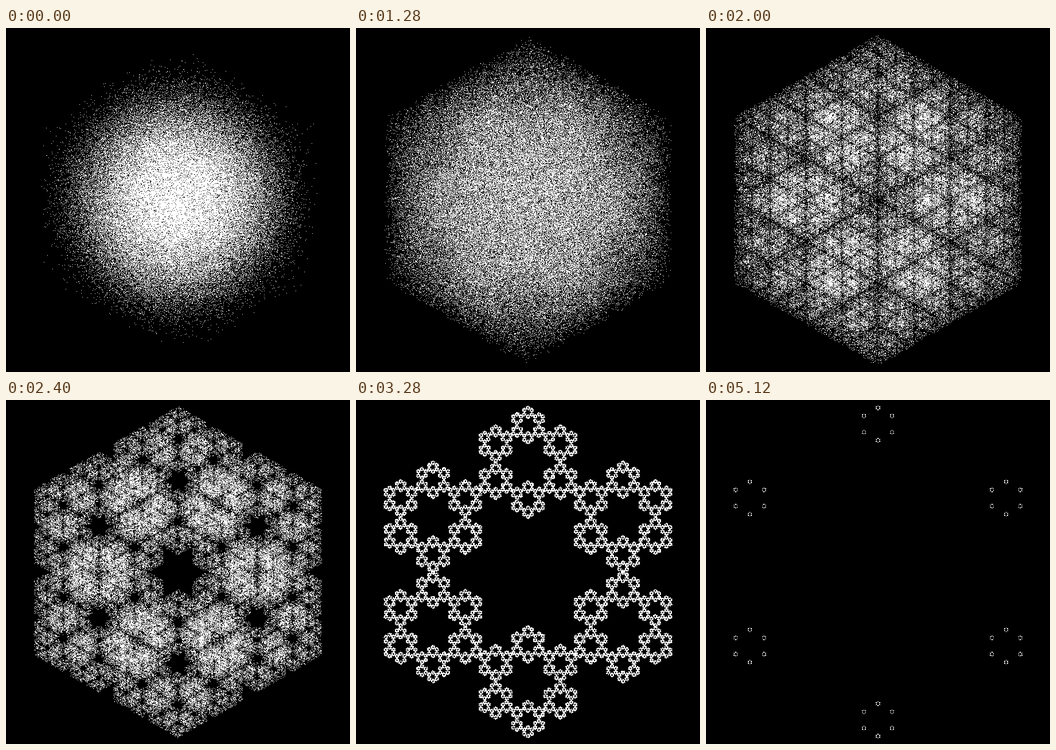
Animation, 600 px wide and 600 px high, one loop 5200 ms. Source, as an HTML page with a canvas:

```html
<!DOCTYPE html>
<html lang="en">
<head>
<meta charset="utf-8">
<title>Hexagon chaos game</title>
<style>
  html, body { margin: 0; width: 100%; height: 100%; overflow: hidden; background: #000; }
  canvas { display: block; width: 600px; height: 600px; image-rendering: pixelated; }
</style>
</head>
<body>
<canvas id="stage" width="600" height="600"></canvas>
<script>
const SIZE = 600, CENTER = 300, RADIUS = 290;
const STEPS = 65, STEP_MS = 80;
const POINTS = 120000, WARMUP = 30;

const ctx = document.getElementById('stage').getContext('2d');
const image = ctx.createImageData(SIZE, SIZE);
const pixels = new Uint32Array(image.data.buffer);
const BLACK = 0xff000000, WHITE = 0xffffffff;

const corners = Array.from({ length: 6 }, (_, i) => {
  const angle = Math.PI / 6 + i * Math.PI / 3;
  return [CENTER + RADIUS * Math.cos(angle), CENTER + RADIUS * Math.sin(angle)];
});

function seededRandom(seed) {
  return () => {
    seed = (seed + 0x6d2b79f5) | 0;
    let t = Math.imul(seed ^ (seed >>> 15), seed | 1);
    t ^= t + Math.imul(t ^ (t >>> 7), t | 61);
    return ((t ^ (t >>> 14)) >>> 0) / 4294967296;
  };
}

// Each jump keeps a fraction of the distance to a random corner;
// that fraction shrinks from 0.75 to 0.11 over the loop.
function draw(step) {
  const keep = 0.75 - step / 100;
  const random = seededRandom(Math.imul(step + 1, 0x9e3779b1));
  let x = CENTER, y = CENTER;
  pixels.fill(BLACK);
  for (let i = -WARMUP; i < POINTS; i++) {
    const [cx, cy] = corners[Math.floor(random() * 6)];
    x = cx + (x - cx) * keep;
    y = cy + (y - cy) * keep;
    if (i >= 0) pixels[Math.floor(y) * SIZE + Math.floor(x)] = WHITE;
  }
  ctx.putImageData(image, 0, 0);
}

let shown = 0;
draw(shown);
const start = performance.now();

function tick() {
  const elapsed = Math.max(0, performance.now() - start);
  const step = Math.floor(elapsed / STEP_MS) % STEPS;
  if (step !== shown) draw(shown = step);
  requestAnimationFrame(tick);
}
requestAnimationFrame(tick);
</script>
</body>
</html>
```
